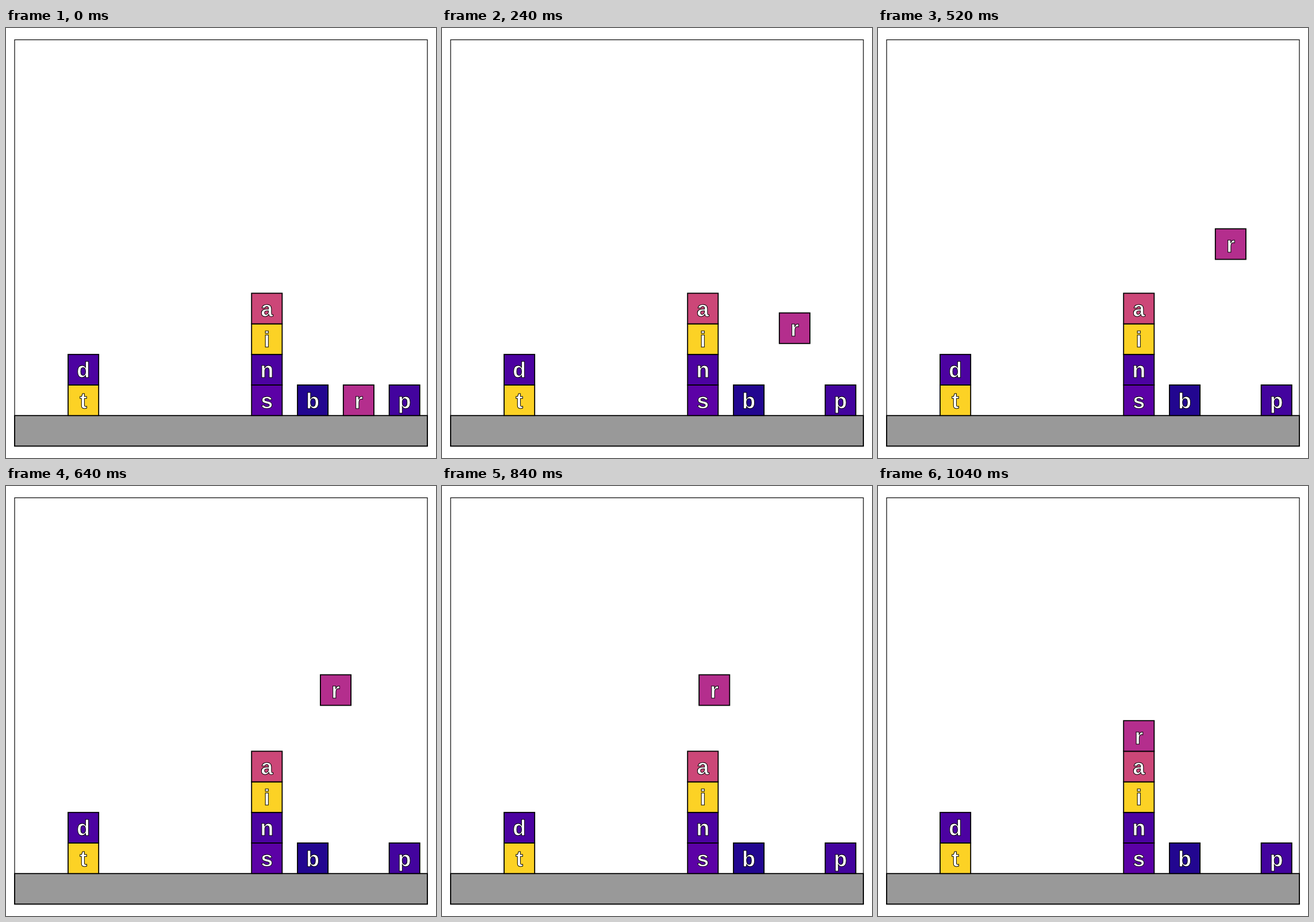
Recreate the animation shown at these times as an HTML page. Size 748 by 748 pixels, loop 1080 ms.

```html
<!DOCTYPE html>
<html lang="en">
<head>
<meta charset="utf-8">
<title>Stacking blocks</title>
<style>
  html, body { margin: 0; width: 100%; height: 100%; overflow: hidden; background: #fff; }
  svg { display: block; width: 100vw; height: 100vh; }
  .block rect { stroke: #000; stroke-width: 1.8; }
  .block text {
    font: bold 38px "Liberation Sans", Arial, sans-serif;
    text-anchor: middle;
    fill: #fff; stroke: #000; stroke-width: 1;
  }
</style>
</head>
<body>
<svg viewBox="0 0 748 748">
  <rect x="15" y="674.2" width="718" height="53.2" fill="#999" stroke="#000" stroke-width="1.8"/>
  <rect x="15" y="20.5" width="718" height="706.9" fill="none" stroke="#000" stroke-width="1.2"/>
</svg>
<script>
const SIZE = 53.2, PITCH = 1.5 * SIZE, LEFT = 108, FLOOR = 674.2;
const STEP = 40, STEPS = 27;
const LIFT_END = 14, SLIDE_END = 22, DROP_END = 26;
const svg = document.querySelector("svg");

const columnX = column => LEFT + column * PITCH;
const levelY = level => FLOOR - (level + 1) * SIZE;

function add(parent, tag, attributes = {}) {
  const node = document.createElementNS("http://www.w3.org/2000/svg", tag);
  for (const [name, value] of Object.entries(attributes)) node.setAttribute(name, value);
  return parent.appendChild(node);
}

function place(block, x, y) {
  block.setAttribute("transform", `translate(${x} ${y})`);
}

function addBlock(letter, fill, column, level) {
  const block = add(svg, "g", { class: "block" });
  add(block, "rect", { width: SIZE, height: SIZE, fill });
  add(block, "text", { x: SIZE / 2, y: 40.6 }).textContent = letter;
  place(block, columnX(column), levelY(level));
  return block;
}

addBlock("t", "#fcd225", 0, 0);
addBlock("d", "#4c02a1", 0, 1);
addBlock("s", "#5c01a6", 4, 0);
addBlock("n", "#4c02a1", 4, 1);
addBlock("i", "#fcd225", 4, 2);
addBlock("a", "#cc4778", 4, 3);
addBlock("b", "#220690", 5, 0);
addBlock("p", "#43039e", 7, 0);
const mover = addBlock("r", "#b42e8d", 6, 0);

const progress = (step, from, to) => Math.min(1, Math.max(0, (step - from) / (to - from)));

// Lift above the stack, slide across, then drop on top.
function draw(time) {
  const step = Math.floor(time / STEP) % STEPS;
  const level = 5.5 * progress(step, 0, LIFT_END) - 1.5 * progress(step, SLIDE_END, DROP_END);
  const column = 6 - 2 * progress(step, LIFT_END, SLIDE_END);
  place(mover, columnX(column), levelY(level));
}

const start = performance.now();
function tick() {
  draw(performance.now() - start);
  requestAnimationFrame(tick);
}
tick();
</script>
</body>
</html>
```
